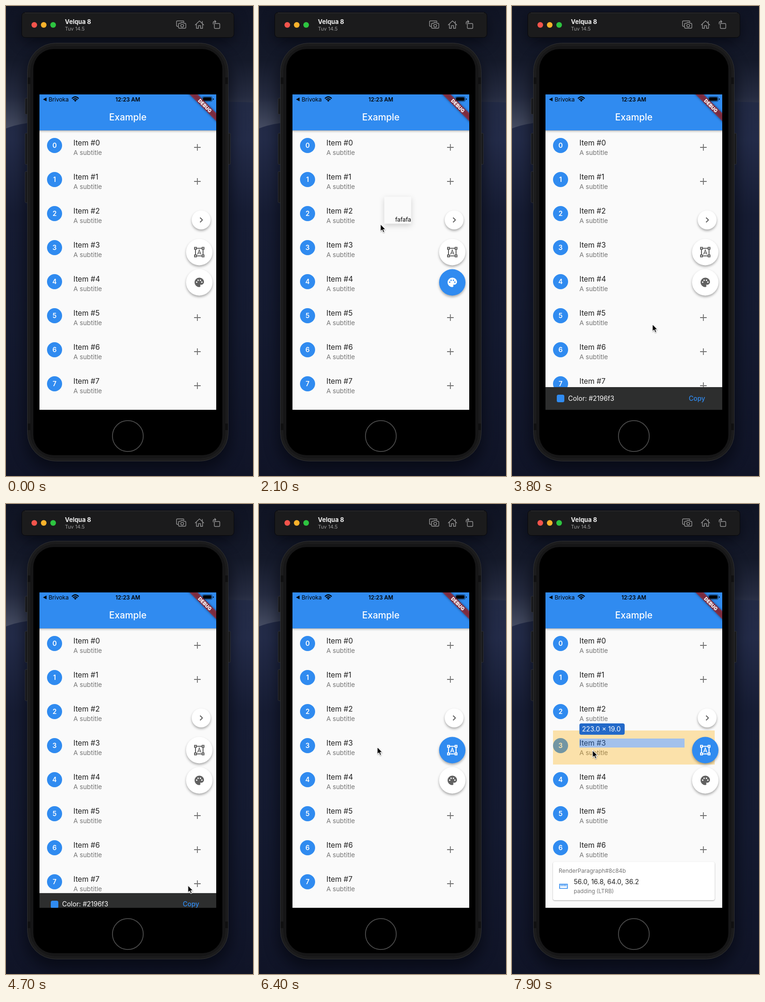
An HTML page that plays this animation: 524 px wide and 994 px high, repeating every 8 s.

```html
<!DOCTYPE html>
<html lang="en">
<head>
<meta charset="utf-8">
<title>Colour picker and inspector</title>
<style>
html, body { margin: 0; width: 100%; height: 100%; overflow: hidden; background: #0e1223; }
svg { display: block; width: 100%; height: 100%; }
text { font-family: Inter, Roboto, sans-serif; }
filter { color-interpolation-filters: sRGB; }
</style>
</head>
<body>
<svg id="stage" viewBox="0 0 524 994">
  <defs>
    <linearGradient id="sky" x1="0" y1="0" x2="0" y2="255" gradientUnits="userSpaceOnUse">
      <stop offset="0" stop-color="#101424"/>
      <stop offset=".45" stop-color="#141929"/>
      <stop offset=".75" stop-color="#252b40"/>
      <stop offset="1" stop-color="#434a60"/>
    </linearGradient>
    <linearGradient id="dune" x1="0" y1="205" x2="0" y2="994" gradientUnits="userSpaceOnUse">
      <stop offset="0" stop-color="#222a45"/>
      <stop offset=".1" stop-color="#232b48"/>
      <stop offset=".3" stop-color="#161c33"/>
      <stop offset=".6" stop-color="#141a30"/>
      <stop offset="1" stop-color="#101427"/>
    </linearGradient>
    <linearGradient id="barShade" x1="0" y1="0" x2="0" y2="1">
      <stop offset="0" stop-opacity=".3"/>
      <stop offset=".4" stop-opacity=".1"/>
      <stop offset="1" stop-opacity="0"/>
    </linearGradient>
    <filter id="glow" x="-20%" y="-60%" width="140%" height="220%"><feGaussianBlur stdDeviation="15"/></filter>
    <filter id="blur" x="-20%" y="-100%" width="140%" height="300%"><feGaussianBlur stdDeviation="2.5"/></filter>
    <filter id="lift" x="-40%" y="-40%" width="180%" height="190%">
      <feDropShadow dx="0" dy="3" stdDeviation="2.8" flood-opacity=".32"/>
    </filter>
    <filter id="soft" x="-50%" y="-50%" width="200%" height="200%">
      <feDropShadow dx="0" dy="4" stdDeviation="6" flood-opacity=".17"/>
    </filter>
    <filter id="thin" x="-5%" y="-10%" width="110%" height="125%">
      <feDropShadow dx="0" dy="1" stdDeviation="1" flood-opacity=".35"/>
    </filter>
    <clipPath id="clip"><rect x="71" y="187" width="375" height="667"/></clipPath>
  </defs>

  <!-- desktop -->
  <rect width="524" height="994" fill="url(#sky)"/>
  <path d="M0 259Q25 249 60 246L460 203Q490 202 524 204V994H0Z" fill="url(#dune)"/>
  <rect x="34" y="24" width="449" height="52" rx="8" fill="#04060e" opacity=".7" filter="url(#glow)"/>
  <rect x="40" y="92" width="437" height="890" rx="66" fill="#04060e" opacity=".65" filter="url(#glow)"/>

  <!-- simulator bar -->
  <rect x="33.5" y="13.5" width="450" height="53" rx="7" fill="#1b1b1c" stroke="#08080a"/>
  <path d="M40 14.5H477" stroke="#353537"/>
  <circle cx="60" cy="40" r="6" fill="#f4544c"/>
  <circle cx="80" cy="40" r="6" fill="#fab22b"/>
  <circle cx="100" cy="40" r="6" fill="#2dc440"/>
  <text x="125" y="38" font-size="13" font-weight="700" fill="#f2f2f2">Velqua 8</text>
  <text x="125" y="52" font-size="10.8" fill="#9b9b9c">Tuv 14.5</text>
  <g fill="none" stroke="#949495" stroke-width="1.4" stroke-linejoin="round" stroke-linecap="round">
    <path d="M365 43H363.500Q361.700 43 361.700 41V33.500Q361.700 31.500 363.700 31.500H375.500Q377.500 31.500 377.500 33.500"/>
    <path d="M368 36.500H370.500L372 34.800H376L377.500 36.500H379.500Q381.500 36.500 381.500 38.500V45Q381.500 47 379.500 47H368Q366 47 366 45V38.500Q366 36.500 368 36.500Z"/>
    <circle cx="373.800" cy="41.600" r="3"/>
    <path d="M401.500 40L410.500 31.500L419.500 40M404 38.500V47.300H408.300V41.500H412.700V47.300H417V38.500M416.500 36V32.500"/>
    <rect x="442" y="37" width="11.500" height="10.500" rx="1.500"/>
    <path d="M439.500 38V35.500Q439.500 33 442 33H445M442.800 30.500L445.300 33L442.800 35.500"/>
  </g>

  <!-- phone -->
  <g fill="#17181b" stroke="#34353a" stroke-width=".8">
    <rect x="40.500" y="195" width="8" height="34" rx="2"/>
    <rect x="40.500" y="269" width="8" height="66" rx="2"/>
    <rect x="40.500" y="350" width="8" height="66" rx="2"/>
    <rect x="468" y="269" width="8" height="66" rx="2"/>
  </g>
  <rect x="45.500" y="78.500" width="426" height="884" rx="60" fill="#1b1b1c" stroke="#303133"/>
  <rect x="50.500" y="83.500" width="416" height="874" rx="55" fill="#161617" stroke="#1f1f20"/>
  <path d="M46 151h6v14h-6zM465 151h6v14h-6zM46 883h6v14h-6zM465 883h6v14h-6z" fill="#101011"/>
  <rect x="58" y="91" width="401" height="859" rx="43"/>
  <circle cx="258.500" cy="909.500" r="32.700" fill="none" stroke="#4b4b4b" stroke-width="1.800"/>

  <g clip-path="url(#clip)">
    <rect x="71" y="187" width="375" height="667" fill="#fafafa"/>
    <g id="list"></g>
    <g id="marks">
      <path d="M87 479H430V551H87ZM143 496V515H366V496Z" fill="#fcae08" fill-opacity=".33"/>
      <rect x="143" y="496" width="223" height="19" fill="#2670d7" fill-opacity=".42"/>
      <rect x="143" y="464" width="96" height="24" rx="4" fill="#2369c8"/>
      <text x="148.500" y="481" font-size="14.100" fill="#fff">223.0 × 19.0</text>
      <rect x="87" y="757" width="343" height="81" rx="4" fill="#fff" filter="url(#thin)"/>
      <text x="99" y="780" font-size="11.900" fill="#757575">RenderParagraph#8c84b</text>
      <text x="131" y="804" font-size="14.100" fill="#242424">56.0, 16.8, 64.0, 36.2</text>
      <text x="131" y="823" font-size="11.700" fill="#757575">padding (LTRB)</text>
      <path d="M101 804H117.500V813H101ZM104.300 804V808.500M107.600 804V808.500M110.900 804V808.500M114.200 804V808.500" fill="none" stroke="#308bf0" stroke-width="1.700"/>
    </g>

    <!-- app bar -->
    <rect x="71" y="187" width="375" height="76" fill="#308bf0"/>
    <rect x="71" y="263" width="375" height="6" fill="url(#barShade)"/>
    <text x="258.500" y="242" font-size="19.500" font-weight="500" fill="#fff" text-anchor="middle">Example</text>
    <path d="M86 193.500V201.500L78.500 197.500Z"/>
    <text x="90.500" y="201.500" font-size="12">Brivoka</text>
    <text x="258.500" y="201.500" font-size="11.600" font-weight="600" text-anchor="middle">12:23 AM</text>
    <path d="M139.800 195.700Q147 188.700 154.200 195.700M142.300 198.300Q147 193.800 151.700 198.300" fill="none" stroke="#000" stroke-width="2.100"/>
    <path d="M144.200 199.600Q147 197.200 149.800 199.600L147 202.500Z"/>
    <rect x="416.500" y="191.500" width="21" height="10.500" rx="3" fill="none" stroke="#123a66"/>
    <rect x="418" y="193" width="18" height="7.500" rx="1.800"/>
    <path d="M439 195V199Q440.800 198 440.800 197T439 195"/>
    <g transform="translate(446 187) rotate(45)">
      <rect x="-48" y="28" width="96" height="12" fill-opacity=".5" filter="url(#blur)"/>
      <rect x="-48" y="28" width="96" height="12" fill="#b71c1c" fill-opacity=".63"/>
      <text y="37.700" font-size="10.200" font-weight="900" fill="#fff" text-anchor="middle">DEBUG</text>
    </g>

    <!-- tool buttons -->
    <circle cx="414" cy="452.500" r="20" fill="#fff" filter="url(#lift)"/>
    <path d="M411.700 447.500L416.700 452.500L411.700 457.500" fill="none" stroke="#5f5f5f" stroke-width="1.900"/>
    <circle id="shapeBtn" cx="410" cy="520.500" r="28" filter="url(#lift)"/>
    <g id="shapeIcon" transform="translate(398 508.500)" fill="none" stroke-width="2">
      <path d="M2 2h4v4h-4zM18 2h4v4h-4zM2 18h4v4h-4zM18 18h4v4h-4zM7 4H17M7 20H17M4 7V17M20 7V17"/>
      <path d="M8.300 17L12 7.500L15.700 17M9.500 14H14.500" stroke-width="1.500"/>
    </g>
    <circle id="dyeBtn" cx="410" cy="584.500" r="28" filter="url(#lift)"/>
    <g transform="translate(398 572.500)">
      <path id="dyeIcon" d="M12 2a10 10 0 0 0 0 20c1.380 0 2.500-1.120 2.500-2.500 0-.61-.23-1.200-.64-1.670-.08-.1-.13-.21-.13-.33 0-.28.22-.5.5-.5H16c3.310 0 6-2.690 6-6C22 6.040 17.510 2 12 2z"/>
      <g id="dyeDots">
        <circle cx="6.500" cy="11.500" r="1.500"/><circle cx="9.500" cy="7.500" r="1.500"/>
        <circle cx="14.500" cy="7.500" r="1.500"/><circle cx="17.500" cy="11.500" r="1.500"/>
      </g>
    </g>

    <g id="snack">
      <rect x="71" y="806" width="375" height="48" fill="#2d2e2e"/>
      <rect x="95" y="822" width="16" height="16" rx="3.500" fill="#308bf0"/>
      <text x="119" y="834.500" font-size="14" fill="#fff">Color: #2196f3</text>
      <text x="375" y="834.500" font-size="13.800" font-weight="500" fill="#308bf0">Copy</text>
    </g>
    <g id="loupe">
      <rect id="swatch" x="8" y="-58" width="57" height="57" filter="url(#soft)"/>
      <text id="hex" x="65" y="-5" font-size="12.300" text-anchor="end"></text>
    </g>
  </g>

  <g id="cursor" filter="url(#thin)">
    <path d="M0 0V15.200L3.500 12L6 17.600L8.500 16.500L6.100 11.100H10.800Z" stroke="#fff" stroke-width="1.100" stroke-linejoin="round"/>
  </g>
</svg>
<script>
const $ = id => document.getElementById(id);
const LOOP = 8000, STEP = 100;
const BLUE = '#308bf0', PAPER = '#fafafa', GREY = '#616161';

$('list').innerHTML = Array.from({ length: 8 }, (_, i) => `
  <g transform="translate(0 ${72 * i})">
    <circle cx="103" cy="295" r="16" fill="${BLUE}"/>
    <text x="103" y="300" font-size="14" font-weight="600" fill="#fff" text-anchor="middle">${i}</text>
    <text x="143" y="295" font-size="15.600" fill="#202020">Item #${i}</text>
    <text x="143" y="315" font-size="13.700" fill="#757575">A subtitle</text>
    <path d="M399 299H413M406 292V306" stroke="#757575" stroke-width="1.800"/>
  </g>`).join('');

// pointer stops: time, x, y
const route = [
  [300, 330, 700], [600, 400, 588], [800, 400, 588], [1100, 242, 577],
  [1500, 225, 535], [2000, 262, 470], [2400, 235, 415], [3000, 108, 453],
  [3200, 101, 440], [3400, 101, 440], [3800, 298, 673], [4300, 386, 824],
  [4600, 386, 824], [5200, 387, 588], [5500, 404, 522], [5800, 404, 522],
  [6400, 251, 514], [6900, 186, 506], [7200, 186, 506], [7900, 171, 521]
];

const clamp = v => Math.max(0, Math.min(1, v));
const ease = v => v * v * (3 - 2 * v);
const ramp = (t, from, span) => ease(clamp((t - from) / span));
const show = (id, on) => $(id).setAttribute('visibility', on ? 'visible' : 'hidden');
const move = (id, x, y) => $(id).setAttribute('transform', `translate(${x} ${y})`);
const paint = (id, color, attr = 'fill') => $(id).setAttribute(attr, color);

function pointer(t) {
  const i = route.findIndex(stop => stop[0] > t);
  if (i < 0) return route[route.length - 1].slice(1);
  if (i === 0) return route[0].slice(1);
  const [t0, x0, y0] = route[i - 1], [t1, x1, y1] = route[i];
  const k = ramp(t, t0, t1 - t0);
  return [x0 + (x1 - x0) * k, y0 + (y1 - y0) * k];
}

function draw(t) {
  const [x, y] = pointer(t);
  move('cursor', x, y);
  show('cursor', t >= 300);

  const dye = t >= 800 && t < 3400;
  paint('dyeBtn', dye ? BLUE : '#fff');
  paint('dyeIcon', dye ? '#fff' : GREY);
  paint('dyeDots', dye ? BLUE : '#fff');

  const shape = t >= 5800;
  paint('shapeBtn', shape ? BLUE : '#fff');
  paint('shapeIcon', shape ? '#fff' : GREY, 'stroke');

  const onBlue = Math.hypot(x - 103, y - 439) < 14;
  show('loupe', t >= 1600 && t < 3400);
  move('loupe', x, y);
  paint('swatch', onBlue ? BLUE : PAPER);
  paint('hex', onBlue ? '#fff' : '#000');
  $('hex').textContent = onBlue ? '2196f3' : 'fafafa';

  const up = ramp(t, 3400, 250) - ramp(t, 4600, 250);
  show('snack', up > 0);
  move('snack', 0, 48 * (1 - up));

  show('marks', t >= 7000);
}

const start = performance.now();
function tick() {
  const t = (performance.now() - start) % LOOP;
  draw(Math.floor(t / STEP) * STEP);
  requestAnimationFrame(tick);
}
tick();
</script>
</body>
</html>
```
